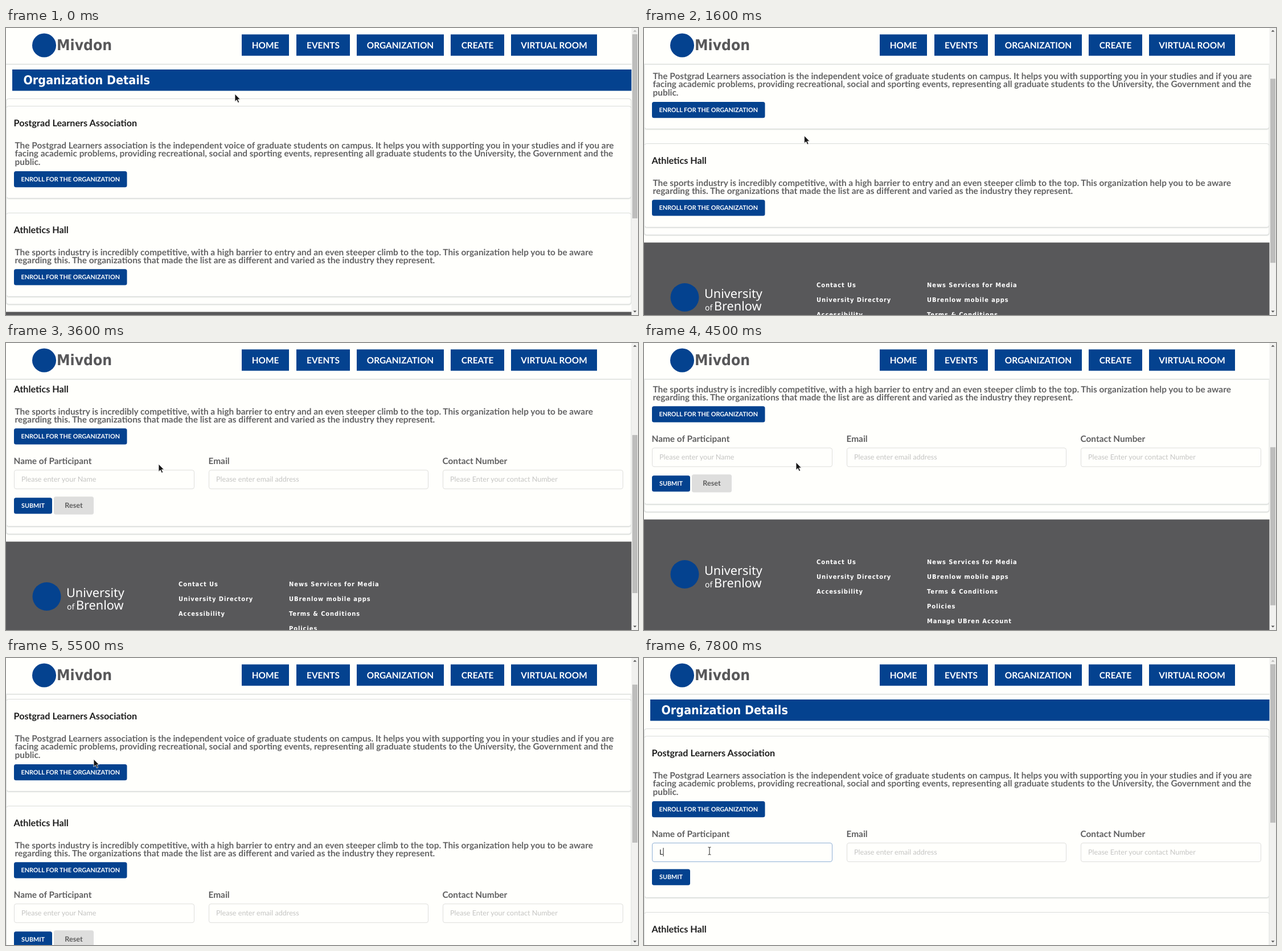
Write an HTML page that moves like this. It is 1110 px wide and 505 px high and loops after 8 s.

```html
<!DOCTYPE html>
<html lang="en">
<head>
<meta charset="utf-8">
<title>Organization Details</title>
<style>
  html, body { margin: 0; width: 100%; height: 100%; overflow: hidden; background: #fffffc; }
  svg { display: block; width: 1110px; height: 505px; }
  text { font-family: Lato, sans-serif; font-weight: 700; white-space: pre; text-rendering: geometricPrecision; }
  .sans { font-family: "DejaVu Sans Condensed", "Noto Sans", sans-serif; }
  .mark { font-family: "Noto Sans", sans-serif; font-weight: 400; }
  .plain { font-weight: 400; }
</style>
</head>
<body>
<script>
const LOOP = 8000, BLUE = '#04428f', YELLOW = '#f8e40b', GREY = '#58585a', PAPER = '#fffffc', LINE = '#d9dcda';
const BASE_HEIGHT = 753, VIEW = 505, TRACK = 483;

function el(parent, tag, attrs = {}, content) {
  const node = document.createElementNS('http://www.w3.org/2000/svg', tag);
  set(node, attrs);
  if (content) node.textContent = content;
  parent.appendChild(node);
  return node;
}
function set(node, attrs) {
  for (const key in attrs) node.setAttribute(key, attrs[key]);
}
const show = (node, on) => set(node, { display: on ? 'inline' : 'none' });
const moveTo = (node, x, y) => set(node, { transform: `translate(${x} ${y})` });
const group = parent => el(parent, 'g');
const rect = (parent, x, y, width, height, fill, more) =>
  el(parent, 'rect', { x, y, width, height, fill, ...more });
const text = (parent, x, y, size, fill, content, more) =>
  el(parent, 'text', { x, y, 'font-size': size, fill, ...more }, content);
const middle = { 'text-anchor': 'middle' };

const svg = el(document.body, 'svg', { viewBox: '0 0 1110 505' });
rect(svg, 0, 0, 1110, 505, PAPER);
const page = group(svg);

// Banner and outer frame
rect(page, 11, 73, 1088, 37.5, BLUE);
text(page, 30.5, 99, 21.4, '#fff', 'Organization Details', { class: 'sans' });
const frame = panel(page, 124.5, 361.5);

function panel(parent, y, height) {
  const g = group(parent);
  const shadow = rect(g, 0.5, y + 1, 1097.5, height, 'none', { rx: 4, stroke: '#e9ebe8', 'stroke-width': 2 });
  const box = rect(g, 0.5, y, 1097.5, height, PAPER, { rx: 4, stroke: LINE });
  return h => [shadow, box].forEach(r => set(r, { height: h }));
}

function button(parent, y, width, label) {
  const box = rect(parent, 14, y, width, 28.2, BLUE, { rx: 3.5 });
  const caption = text(parent, 14 + width / 2, y + 17.8, 10.8, '#fff', label, middle);
  return hover => {
    set(box, { fill: hover ? YELLOW : BLUE });
    set(caption, { fill: hover ? GREY : '#fff' });
  };
}

function form(parent, top, hasReset) {
  const g = group(parent), fields = [
    [14, 317, 'Name of Participant', 'Please enter your Name'],
    [356, 386, 'Email', 'Please enter email address'],
    [767, 317, 'Contact Number', 'Please Enter your contact Number'],
  ].map(([x, width, label, hint]) => {
    text(g, x - 0.5, top + 62.5, 15.4, '#606061', label);
    return {
      box: rect(g, x + 0.5, top + 73.5, width - 1, 33, PAPER, { rx: 3.5, stroke: '#dededc' }),
      hint: text(g, x + 13, top + 94, 12.6, '#c5c5c3', hint, { class: 'plain' }),
    };
  });
  button(g, top + (hasReset ? 122 : 119.5), 67, 'SUBMIT');
  if (hasReset) {
    rect(g, 84, top + 120, 70, 31.5, '#dededd', { rx: 3.5 });
    text(g, 119, top + 140, 12.6, '#5d5d5d', 'Reset', middle);
  }
  return { g, name: fields[0] };
}

function card({ title, lines, y, height, extra, hasReset }) {
  const g = group(page), resize = panel(g, 0.5, height);
  const top = 67.6 + 15.8 * lines.length;
  text(g, 13.5, 36, 16.2, '#1e1e1e', title);
  lines.forEach((line, i) => text(g, 15.5, 74.5 + 14.7 * i, 15.4, '#636364', line));
  const paint = button(g, top, 198.5, 'ENROLL FOR THE ORGANIZATION');
  const fields = form(g, top, hasReset);
  return { g, y, height, extra, top, paint, resize, fields };
}

const cards = [
  card({
    title: 'Postgrad Learners Association', y: 137, height: 162, extra: 122,
    lines: [
      'The Postgrad Learners association is the independent voice of graduate students on campus. It helps you with supporting you in your studies and if you are',
      'facing academic problems, providing recreational, social and sporting events, representing all graduate students to the University, the Government and the',
      'public.',
    ],
  }),
  card({
    title: 'Athletics Hall', y: 325, height: 147, extra: 124, hasReset: true,
    lines: [
      'The sports industry is incredibly competitive, with a high barrier to entry and an even steeper climb to the top. This organization help you to be aware',
      'regarding this. The organizations that made the list are as different and varied as the industry they represent.',
    ],
  }),
];

const nameField = cards[0].fields.name;
const typed = text(cards[0].g, 27, cards[0].top + 94, 12.6, '#222', 'L', { class: 'plain' });
const caret = rect(cards[0].g, 0, cards[0].top + 82, 1, 15, '#222');

// Footer
const footer = group(page);
rect(footer, 0, 0.5, 1099, 254, GREY);
el(footer, 'circle', { cx: 71.5, cy: 97, r: 25, fill: BLUE });
text(footer, 106, 98, 21.7, '#fff', 'University', { class: 'mark' });
text(footer, 107, 120.3, 14, '#fff', 'of', { class: 'mark' });
text(footer, 123, 120.3, 21.7, '#fff', 'Brenlow', { class: 'mark' });
const links = [
  [303, ['Contact Us', 'University Directory', 'Accessibility']],
  [497, ['News Services for Media', 'UBrenlow mobile apps', 'Terms & Conditions', 'Policies', 'Manage UBren Account']],
];
for (const [x, labels] of links) {
  labels.forEach((label, i) =>
    text(footer, x, 79 + 26 * i, 11, '#fff', label, { class: 'sans', 'letter-spacing': 0.94 }));
}

// Fixed header
rect(svg, 0, 0, 1099, 63, PAPER);
rect(svg, 0, 63, 1099, 1, LINE);
rect(svg, 0, 64, 1099, 1, '#f0f1ee');
el(svg, 'circle', { cx: 67, cy: 30.5, r: 21, fill: BLUE });
text(svg, 89, 39, 26.3, GREY, 'Mivdon', { class: 'sans' });
const nav = [[414, 83, 'HOME'], [510, 94, 'EVENTS'], [616, 153, 'ORGANIZATION'], [781, 94, 'CREATE'], [887, 151, 'VIRTUAL ROOM']];
for (const [x, width, label] of nav) {
  rect(svg, x, 11.3, width, 37.5, BLUE);
  text(svg, x + width / 2, 35.7, 15.4, '#fff', label, middle);
}

// Scrollbar
rect(svg, 1098.5, 0, 11.5, 505, '#f1f1ef');
const thumb = rect(svg, 1100, 11, 9, 0, '#bdbdbc');
const upArrow = el(svg, 'path', { d: 'M1101.5 6.5h6l-3-3z' });
el(svg, 'path', { d: 'M1101.5 497.5h6l-3 3z', fill: '#505050' });

// Pointers, with their hot spot at 0,0
const pointers = {
  arrow: el(svg, 'path', { d: 'M0 0V13.5L3.2 10.6 5.4 15.6 7.7 14.6 5.5 9.8H9.5Z', fill: '#161616', stroke: '#fff', 'stroke-width': 0.8 }),
  hand: el(svg, 'path', {
    d: 'M-1.3 9V1Q0-1 1.3 1V6Q2.6 4.8 3.6 6.2 5 5.2 5.8 6.8 7.4 6 7.4 8V11.5L6 15H-1L-4.3 10Q-4.4 7.5-2.5 8.2Z',
    fill: '#fff', stroke: '#222', 'stroke-width': 1.1, 'stroke-linejoin': 'round',
  }),
  beam: el(svg, 'path', { d: 'M-2.5-6.5H-1L0-6 1-6.5H2.5M0-6V6M-2.5 6.5H-1L0 6 1 6.5H2.5', fill: 'none', stroke: '#222' }),
};

const scrollKeys = [[400, 0], [900, 44], [1300, 84], [2000, 173], [2600, 173], [3200, 196], [3600, 274], [3800, 352],
  [3900, 352], [4000, 372], [4300, 372], [4500, 313], [5200, 112], [5500, 65], [6000, 0]];
const pointerKeys = [[200, 402, 116], [300, 380, 135], [1300, 380, 135], [2000, 150, 262], [2300, 150, 262],
  [2400, 153, 266], [2500, 153, 266], [3100, 268, 213], [4300, 268, 213], [4500, 267, 210], [5500, 154, 178],
  [6000, 154, 262], [6100, 154, 262], [6200, 150, 260], [6500, 150, 260], [6700, 117, 334], [7300, 115, 339.5]];

function at(keys, t, column = 1) {
  const next = keys.findIndex(key => key[0] > t);
  if (next === 0) return keys[0][column];
  if (next < 0) return keys[keys.length - 1][column];
  const a = keys[next - 1], b = keys[next];
  return a[column] + (b[column] - a[column]) * (t - a[0]) / (b[0] - a[0]);
}

function draw(time) {
  const t = Math.floor(time / 100) * 100;
  const scroll = Math.round(at(scrollKeys, t));
  const x = at(pointerKeys, t, 1), y = at(pointerKeys, t, 2);
  const opened = t < 2500 ? -1 : t < 6500 ? 1 : 0;

  let shift = 0, overButton = false;
  cards.forEach((c, i) => {
    const open = i === opened, top = c.y + shift + c.top - scroll;
    const hover = x > 14 && x < 212 && y >= top && y <= top + 28.2;
    moveTo(c.g, 0, c.y + shift);
    c.resize(c.height + (open ? c.extra : 0));
    c.paint(hover);
    show(c.fields.g, open);
    overButton = overButton || hover;
    if (open) shift += c.extra;
  });
  frame(361.5 + shift);
  moveTo(footer, 0, 499 + shift);
  moveTo(page, 0, -scroll);

  const focused = t >= 6700, hasText = t >= 7800;
  set(nameField.box, { stroke: focused ? '#8fb0d6' : '#dededc' });
  show(nameField.hint, !hasText);
  show(typed, hasText);
  show(caret, focused && (t < 7200 || t >= 7700));
  set(caret, { x: hasText ? 33.5 : 27 });

  const pageHeight = BASE_HEIGHT + shift;
  set(thumb, { y: 11 + scroll * TRACK / pageHeight, height: VIEW * TRACK / pageHeight });
  set(upArrow, { fill: scroll ? '#505050' : '#b5b5b4' });

  const shape = overButton ? 'hand' : focused ? 'beam' : 'arrow';
  for (const name in pointers) {
    show(pointers[name], name === shape);
    moveTo(pointers[name], x, y);
  }
}

const start = performance.now();
function tick() {
  draw((performance.now() - start) % LOOP);
  requestAnimationFrame(tick);
}
tick();
</script>
</body>
</html>
```
